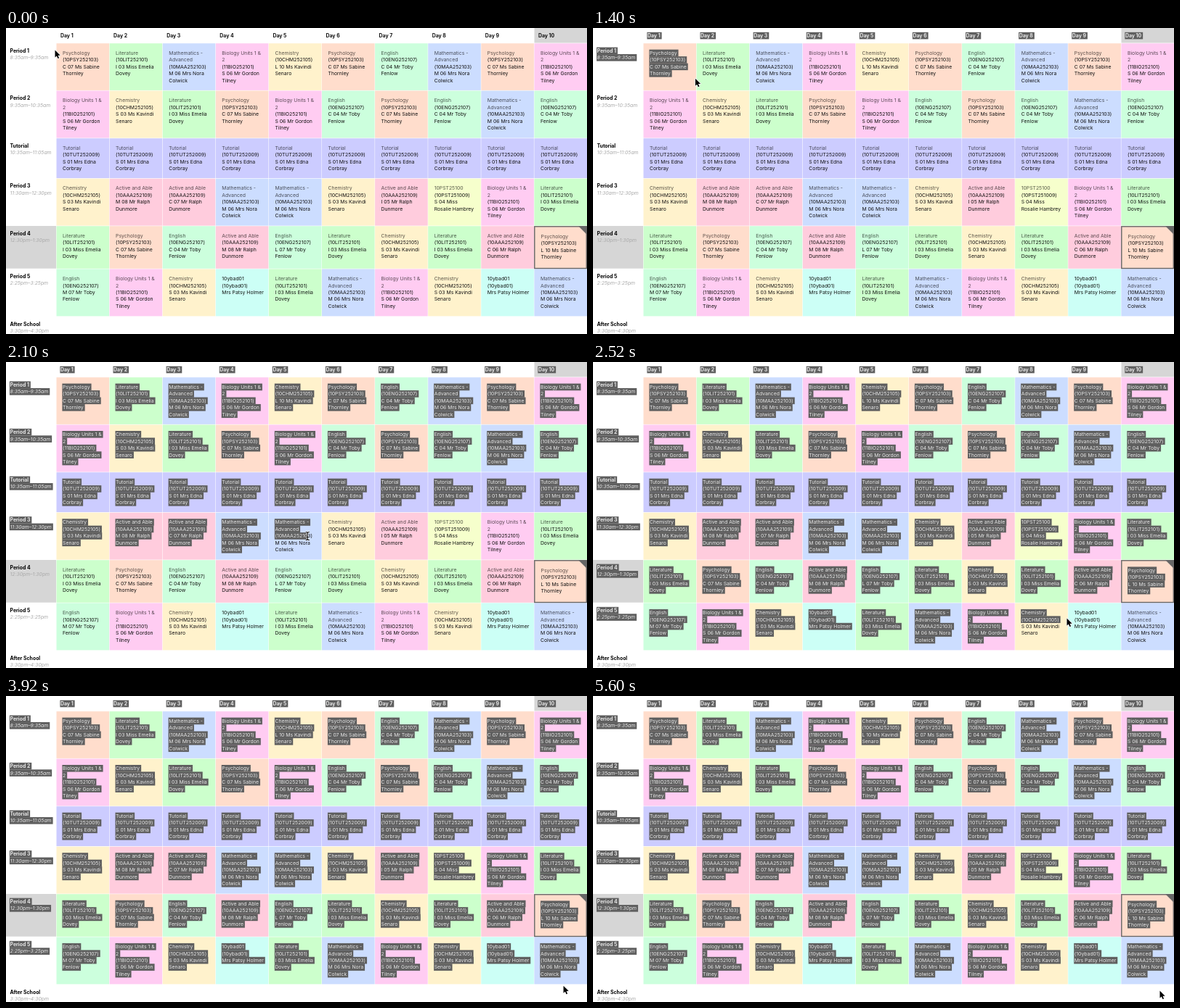
Write an HTML page with a canvas that moves like this. It is 800 by 422 pixels and loops after 5.67 s.

```html
<!DOCTYPE html>
<html lang="en">
<head>
<meta charset="utf-8">
<title>Timetable selection</title>
<style>
  html, body { margin: 0; width: 100%; height: 100%; overflow: hidden; background: #fff; }
  canvas { display: block; }
</style>
</head>
<body>
<canvas id="stage" width="800" height="422"></canvas>
<script>
const ctx = document.getElementById('stage').getContext('2d');
const LOOP = 5670, STEP = 70, DRAG_START = 1120;
const LEFT = 69.3, COL = 73.1, LINE = 9.45;
const family = 'Inter, "Liberation Sans", sans-serif';
const fonts = {
  body: `400 6.85px ${family}`,
  bold: `700 6.9px ${family}`,
  time: `italic 400 6.85px ${family}`
};

const subjects = {
  P: { fill: '#ffddcc', title: ['Psychology'], code: '10PSY252103', room: 'C 07', who: ['Ms Sabine', 'Thornley'] },
  L: { fill: '#ccffcc', title: ['Literature'], code: '10LIT252101', room: 'I 03', who: ['Miss Emelia', 'Dovey'] },
  M: { fill: '#ccddff', title: ['Mathematics -', 'Advanced'], code: '10MAA252103', room: 'M 06', who: ['Mrs Nora', 'Colwick'] },
  B: { fill: '#ffccf2', title: ['Biology Units 1 &', '2'], code: '11BIO252101', room: 'S 06', who: ['Mr Gordon', 'Tilney'] },
  C: { fill: '#fff2cc', title: ['Chemistry'], code: '10CHM252105', room: 'S 03', who: ['Ms Kavindi', 'Senaro'] },
  E: { fill: '#ccffdd', title: ['English'], code: '10ENG252107', room: 'C 04', who: ['Mr Toby', 'Fenlow'] },
  T: { fill: '#ccccff', title: ['Tutorial'], code: '10TUT252009', room: 'S 01', who: ['Mrs Edna', 'Corbray'] },
  A: { fill: '#ffccdd', title: ['Active and Able'], code: '10AAA252109', room: 'M 08', who: ['Mr Ralph', 'Dunmore'] },
  S: { fill: '#f6ffcc', title: ['10PST25100'], code: '10PST251009', room: 'S 04', who: ['Miss', 'Rosalie Hambrey'] },
  Y: { fill: '#ccfff6', title: ['10ybad01'], code: '10ybad01', room: '', who: ['Mrs Patsy Holmer'], dark: true }
};

// Each cell is a subject letter, optionally followed by a different room.
const rows = [
  { top: 21, name: 'Period 1', time: '8:35am–9:35am', cells: 'P,L,M,B,C:L 10,P,E,M,P,B' },
  { top: 86.3, name: 'Period 2', time: '9:35am–10:35am', cells: 'B,C,L,P,B,E,P,E,M,E' },
  { top: 152, name: 'Tutorial', time: '10:35am–11:05am', cells: 'T,T,T,T,T,T,T,T,T,T' },
  { top: 207.5, name: 'Period 3', time: '11:30am–12:30pm', cells: 'C,A,A:C 07,M,M,C,A:I 05,S,B,L' },
  { top: 273, name: 'Period 4', time: '12:30pm–1:30pm', cells: 'L,P,E,A,E:L 07,L,C,L,A:C 06,P:L 10' },
  { top: 332.2, name: 'Period 5', time: '2:25pm–3:25pm', cells: 'E:M 07,B,C,Y,L,M,B,C,Y,M' },
  { top: 397.8, name: 'After School', time: '3:30pm–4:30pm', cells: '' }
];

// Pointer path: time, x, y.
const path = [
  [0, 67, 30], [420, 78, 14], [770, 82, 12], [DRAG_START, 75, 11],
  [1470, 148, 76], [1680, 148, 76], [1820, 223, 132], [2520, 652, 353],
  [2940, 716, 372], [3430, 738, 377], [3990, 768, 400], [4410, 768, 400],
  [4620, 780, 406], [LOOP, 780, 406]
];

const line = (text, font, color) => ({ text, font, color });

// Text blocks in document order, which is also the selection order.
function buildBlocks() {
  const list = [];
  for (let i = 0; i < 10; i++) {
    list.push({ row: -1, col: i, x: 75 + COL * i, y: 5.8, lines: [line(`Day ${i + 1}`, 'bold', '#111')] });
  }
  rows.forEach((r, row) => {
    list.push({
      row, col: -1, x: 5.5, y: r.top + 5.6,
      lines: [line(r.name, 'bold', '#000'), line(r.time, 'time', '#aaa')]
    });
    if (!r.cells) return;
    r.cells.split(',').forEach((entry, col) => {
      const [key, room] = entry.split(':');
      const s = subjects[key];
      const shift = isFocused(row, col) ? 0.7 : 0;
      const [first, ...rest] = s.who;
      const details = [`(${s.code})`, `${room || s.room} ${first}`.trim(), ...rest];
      list.push({
        row, col, fill: s.fill, x: 78 + COL * col + shift, y: r.top + 8.7 + shift,
        lines: [
          ...s.title.map(t => line(t, 'body', s.dark ? '#111' : 'rgba(0,0,0,.65)')),
          ...details.map(t => line(t, 'body', '#111'))
        ]
      });
    });
  });
  return list;
}

function isFocused(row, col) { return row === 4 && col === 9; }

const blocks = buildBlocks();
const lastSelectable = blocks.length - 2;

function textWidth(font, text) {
  ctx.font = fonts[font];
  return ctx.measureText(text).width;
}

function pointerAt(t) {
  let i = 0;
  while (i < path.length - 2 && t >= path[i + 1][0]) i++;
  const a = path[i], b = path[i + 1], span = b[0] - a[0];
  const u = (t - a[0]) / span;
  const slope = (k, axis) => {
    const p = path[k - 1], q = path[k], n = path[k + 1];
    if (!p || !n) return 0;
    const before = (q[axis] - p[axis]) / (q[0] - p[0]);
    const after = (n[axis] - q[axis]) / (n[0] - q[0]);
    return before * after <= 0 ? 0 : 2 * before * after / (before + after);
  };
  const ease = axis => {
    const v = u * u * (3 - 2 * u);
    return a[axis] + (b[axis] - a[axis]) * v
      + span * (slope(i, axis) * u * (1 - u) ** 2 - slope(i + 1, axis) * u * u * (1 - u));
  };
  return { x: ease(1), y: ease(2) };
}

function blockUnder({ x, y }) {
  let row = -1;
  rows.forEach((r, i) => { if (y >= r.top) row = i; });
  const col = x < LEFT ? -1 : Math.min(9, Math.floor((x - LEFT) / COL));
  return blocks.findIndex(b => b.row === row && b.col === col);
}

// Where the selection stops: block, line and character.
function selectionEnd(p) {
  const index = blockUnder(p);
  if (index < 0 || index > lastSelectable) return { index: lastSelectable + 1, row: 0, chars: 0 };
  const block = blocks[index];
  const row = Math.floor((p.y - block.y) / LINE);
  const current = block.lines[row];
  let chars = 0;
  if (current) {
    const { font, text } = current;
    while (chars < text.length) {
      const middle = (textWidth(font, text.slice(0, chars)) + textWidth(font, text.slice(0, chars + 1))) / 2;
      if (block.x + middle > p.x) break;
      chars++;
    }
  }
  return { index, row, chars };
}

function selectedChars(end, index, row, length) {
  if (!end || index > end.index) return 0;
  if (index < end.index || row < end.row) return length;
  return row === end.row ? end.chars : 0;
}

function drawLine(item, x, y, chars) {
  const base = y + LINE / 2 + 2.5;
  const put = (text, dx, color) => {
    ctx.fillStyle = color;
    ctx.fillText(text, x + dx, base);
  };
  const head = item.text.slice(0, chars);
  const width = textWidth(item.font, head);
  if (chars) {
    const pad = chars === item.text.length ? 2 : 0;
    ctx.fillStyle = '#5f5f5f';
    ctx.fillRect(x - 0.6, y, width + 0.6 + pad, LINE + 0.15);
    put(head, 0, '#e8e8e8');
  }
  if (chars < item.text.length) put(item.text.slice(chars), width, item.color);
}

function drawGrid() {
  ctx.fillStyle = '#fff';
  ctx.fillRect(0, 0, 800, 422);
  ctx.fillStyle = '#d6d6d6';
  ctx.fillRect(727.5, 0, 72.5, 20.5);
  ctx.fillRect(0, rows[4].top, 69, 58.7);
  for (const b of blocks) {
    if (!b.fill) continue;
    const x = LEFT + COL * b.col, y = rows[b.row].top;
    ctx.fillStyle = b.fill;
    ctx.fillRect(x + 0.2, y + 0.2, COL - 0.5, rows[b.row + 1].top - y - 0.6);
  }
  const top = rows[4].top;
  ctx.strokeStyle = '#666';
  ctx.lineWidth = 1.4;
  ctx.strokeRect(727.8, top + 0.8, 71.5, 57.7);
  ctx.fillStyle = '#666';
  fillShape([[788, top], [800, top], [800, top + 12]]);
}

function fillShape(points) {
  ctx.beginPath();
  points.forEach(([x, y]) => ctx.lineTo(x, y));
  ctx.closePath();
  ctx.fill();
}

function drawArrow({ x, y }) {
  ctx.save();
  ctx.translate(x, y);
  ctx.fillStyle = '#000';
  ctx.strokeStyle = '#fff';
  ctx.lineWidth = 1.4;
  ctx.lineJoin = 'round';
  ctx.beginPath();
  [[0.5, 0.5], [0.5, 10.5], [2.8, 8.4], [4.4, 12.1], [6.1, 11.4], [4.5, 7.8], [7.7, 7.7]]
    .forEach(([px, py]) => ctx.lineTo(px, py));
  ctx.closePath();
  ctx.stroke();
  ctx.fill();
  ctx.restore();
}

function drawBeam({ x, y }) {
  ctx.beginPath();
  for (const s of [-1, 1]) {
    ctx.moveTo(x - 2.5, y + 5.5 * s);
    ctx.quadraticCurveTo(x, y + 5.5 * s, x, y + 4 * s);
    ctx.quadraticCurveTo(x, y + 5.5 * s, x + 2.5, y + 5.5 * s);
  }
  ctx.moveTo(x, y - 4.5);
  ctx.lineTo(x, y + 4.5);
  ctx.moveTo(x - 1.5, y + 1.5);
  ctx.lineTo(x + 1.5, y + 1.5);
  for (const [color, width] of [['#fff', 2.4], ['#000', 1.1]]) {
    ctx.strokeStyle = color;
    ctx.lineWidth = width;
    ctx.stroke();
  }
}

function overText(p) {
  const b = blocks[blockUnder(p)];
  return b && p.x >= b.x - 1 && p.x < b.x + 56 && p.y >= b.y && p.y < b.y + b.lines.length * LINE;
}

function render(t) {
  const pointer = pointerAt(t);
  const end = t >= DRAG_START ? selectionEnd(pointer) : null;
  drawGrid();
  blocks.forEach((b, i) => b.lines.forEach((item, row) => {
    const chars = i > lastSelectable ? 0 : selectedChars(end, i, row, item.text.length);
    drawLine(item, b.x, b.y + row * LINE, chars);
  }));
  (overText(pointer) ? drawBeam : drawArrow)(pointer);
}

const start = performance.now();
function tick() {
  const t = (performance.now() - start) % LOOP;
  render(Math.floor(t / STEP) * STEP);
  requestAnimationFrame(tick);
}
tick();
</script>
</body>
</html>
```
